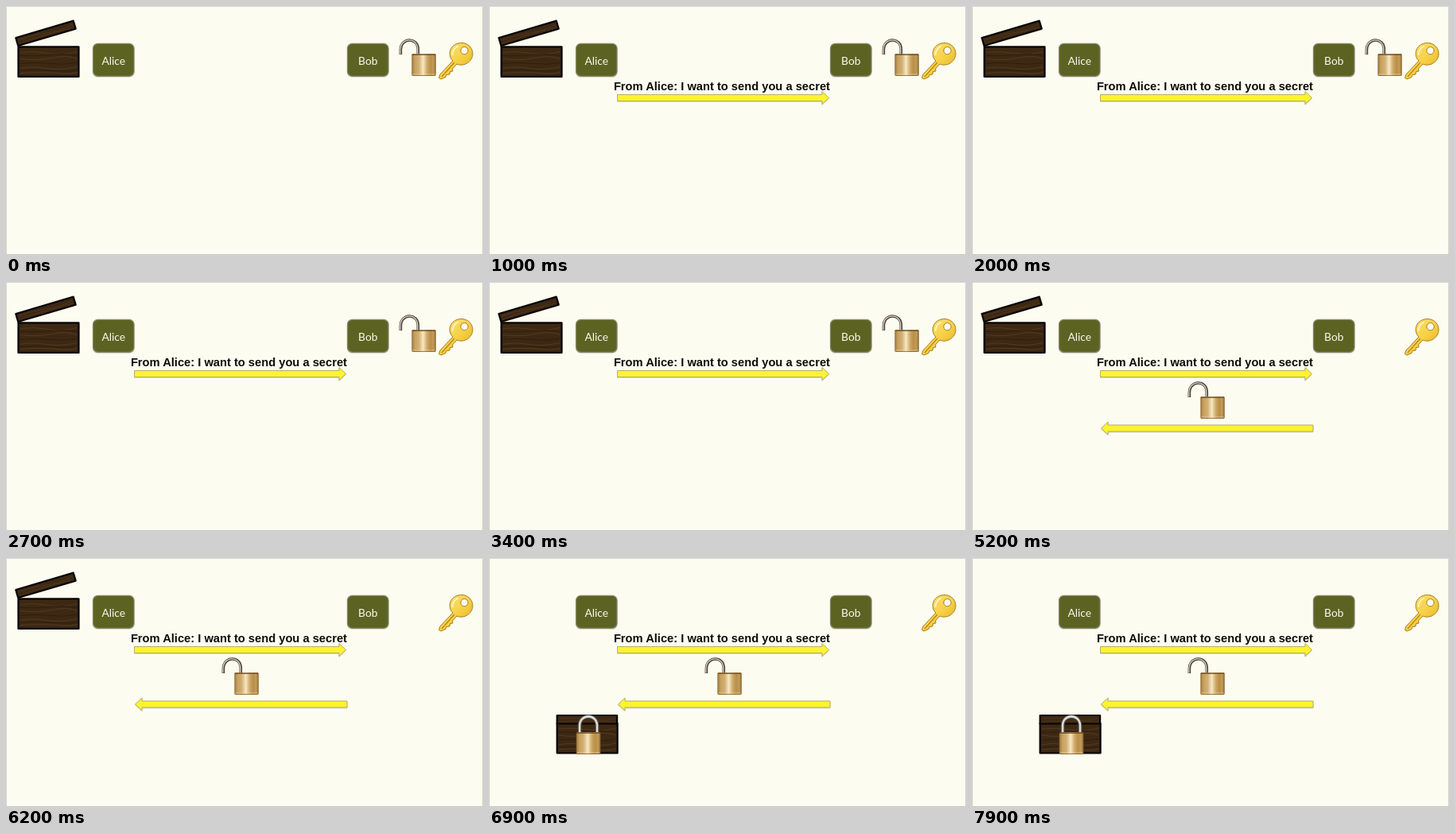
Write an HTML page that moves like this. It is 600 by 312 pixels and loops after 8 s.

```html
<!DOCTYPE html>
<html lang="en">
<head>
<meta charset="utf-8">
<title>Sending a secret</title>
<style>
html, body { margin: 0; width: 100%; height: 100%; overflow: hidden; background: #fdfcf0; }
svg { display: block; width: 600px; height: 312px; }
.name { font: 13.8px Lato, "Open Sans", sans-serif; fill: #fafaf0; text-anchor: middle; }
.message { font: bold 14.7px "Liberation Sans", Arial, sans-serif; fill: #0c0c08; }
.card { fill: #5c6420; stroke: #85896c; stroke-width: 1.2; filter: url(#shadow); }
.arrow { fill: #fdf32f; stroke: #b5ae68; stroke-width: 1; filter: url(#shadow); }
.wood { fill: #3d2813; stroke: #060403; stroke-width: 2.2; stroke-linejoin: round; }
.grain { fill: none; stroke-width: 1; }
</style>
</head>
<body>
<svg viewBox="0 0 600 312">
  <defs>
    <filter id="shadow" x="-10%" y="-20%" width="120%" height="150%">
      <feDropShadow dx="0" dy=".6" stdDeviation="0.7" flood-color="#666" flood-opacity=".4"/>
    </filter>
    <linearGradient id="brass">
      <stop offset="0" stop-color="#96703a"/>
      <stop offset=".12" stop-color="#c6a05c"/>
      <stop offset=".3" stop-color="#d2b074"/>
      <stop offset=".47" stop-color="#f6e8c4"/>
      <stop offset=".64" stop-color="#cda763"/>
      <stop offset=".78" stop-color="#b88e4a"/>
      <stop offset=".9" stop-color="#c39c58"/>
      <stop offset="1" stop-color="#85602d"/>
    </linearGradient>
    <linearGradient id="gold" x1="0" y1="0" x2="1" y2="1">
      <stop offset="0" stop-color="#fbe88a"/>
      <stop offset=".55" stop-color="#f6cf42"/>
      <stop offset="1" stop-color="#dca51f"/>
    </linearGradient>

    <g id="chest">
      <rect class="wood" width="76" height="37.5"/>
      <path class="grain" stroke="#533a21" d="M2 7Q20 5 38 8T74 6M2 15Q22 18 42 14T74 15M2 27Q16 24 34 27T74 25M2 33Q30 31 48 33T74 32"/>
      <path class="grain" stroke="#301d0d" d="M2 11Q24 12 40 10T74 11M2 21Q20 19 38 21T74 20M2 30Q24 28 44 30T74 29"/>
    </g>
    <g id="lid">
      <rect class="wood" width="75.5" height="10.5"/>
      <path class="grain" stroke="#4c341c" d="M2 4Q20 2 38 5T73 4M2 8Q30 6 73 8"/>
    </g>

    <g id="lockBody">
      <rect width="30.5" height="27.5" rx="1.5" fill="url(#brass)"/>
      <path d="M.5 .8H30" stroke="#6d4a1f" stroke-width="1.4"/>
      <path d="M1 25.5H29.5" stroke="#ecd5a3" stroke-opacity=".6"/>
      <path d="M1 27.2H29.5" stroke="#85602f" stroke-width=".8"/>
    </g>
    <g id="openLock">
      <g fill="none">
        <path d="M496.4 61V55.5C496.4 39 518.3 39 518.3 54.5V61" stroke="#4d443a" stroke-width="3.6"/>
        <path d="M495.9 60.5V55.5C496.2 38.8 517.8 38.8 517.8 54.5V61" stroke="#d0cbc0" stroke-width="1.4"/>
      </g>
      <use href="#lockBody" x="510.3" y="60.3"/>
    </g>
    <g id="closedLock">
      <g fill="none">
        <path d="M114 221V211C114 195.5 136 195.5 136 211V221" stroke="#4d4a44" stroke-width="4.6"/>
        <path d="M114 221V211C114 195.5 136 195.5 136 211V221" stroke="#dcdad4" stroke-width="2.6"/>
      </g>
      <use href="#lockBody" x="109.8" y="219.3"/>
    </g>
  </defs>

  <rect width="600" height="312" fill="#fdfcf0"/>
  <path d="M.5 312V.5H599.5V312" fill="none" stroke="#d6d6cd"/>

  <rect class="card" x="109.5" y="47.3" width="51.5" height="41" rx="6"/>
  <text class="name" x="135.3" y="73.8">Alice</text>
  <rect class="card" x="429.5" y="47.3" width="51.5" height="41" rx="6"/>
  <text class="name" x="455.3" y="73.8">Bob</text>

  <g stroke="#a67a1b" stroke-linejoin="round">
    <path fill="url(#gold)" fill-rule="evenodd" d="M562 69C555 62 558 50 568 47.2C577 44.2 587 50 587 60C587 70 576 77 567 73L561.5 79L562 82L558.5 82.5L558 86L554 86.5L553 89.5L547 92L544.5 90.5L546 86ZM576.5 51.5a4.6 4.6 0 1 0 .1 0Z"/>
    <path d="M564 71L548 89" stroke="#b98419" stroke-width="1.2"/>
    <path d="M561.5 62Q562 53 569 50.5" fill="none" stroke="#fff6c4" stroke-width="1.8"/>
  </g>

  <g data-from="0" data-to="6300">
    <use href="#lid" transform="translate(12.3 40) rotate(-16.5)"/>
    <use href="#chest" x="15.5" y="51.4"/>
  </g>
  <use href="#openLock" data-from="0" data-to="4000"/>

  <g data-from="1000" data-to="8000">
    <text class="message" x="156.9" y="105.8">From Alice: I want to send you a secret</text>
    <path class="arrow" d="M161.5 111.5H419V107.5L427.5 115.5L419 123.5V119.5H161.5Z"/>
  </g>
  <g data-from="4000" data-to="8000">
    <use href="#openLock" x="-223" y="84"/>
    <path class="arrow" d="M429 180H171V176L162.5 184L171 192V188H429Z"/>
  </g>
  <g data-from="6300" data-to="8000">
    <use href="#chest" x="85.6" y="208"/>
    <use href="#lid" x="85.6" y="198"/>
    <use href="#closedLock"/>
  </g>
</svg>
<script>
const LOOP = 8000;
const parts = document.querySelectorAll("[data-from]");
const start = performance.now();

function draw() {
  const t = (performance.now() - start) % LOOP;
  for (const part of parts) {
    const { from, to } = part.dataset;
    part.style.display = t >= +from && t < +to ? "" : "none";
  }
  requestAnimationFrame(draw);
}
draw();
</script>
</body>
</html>
```
